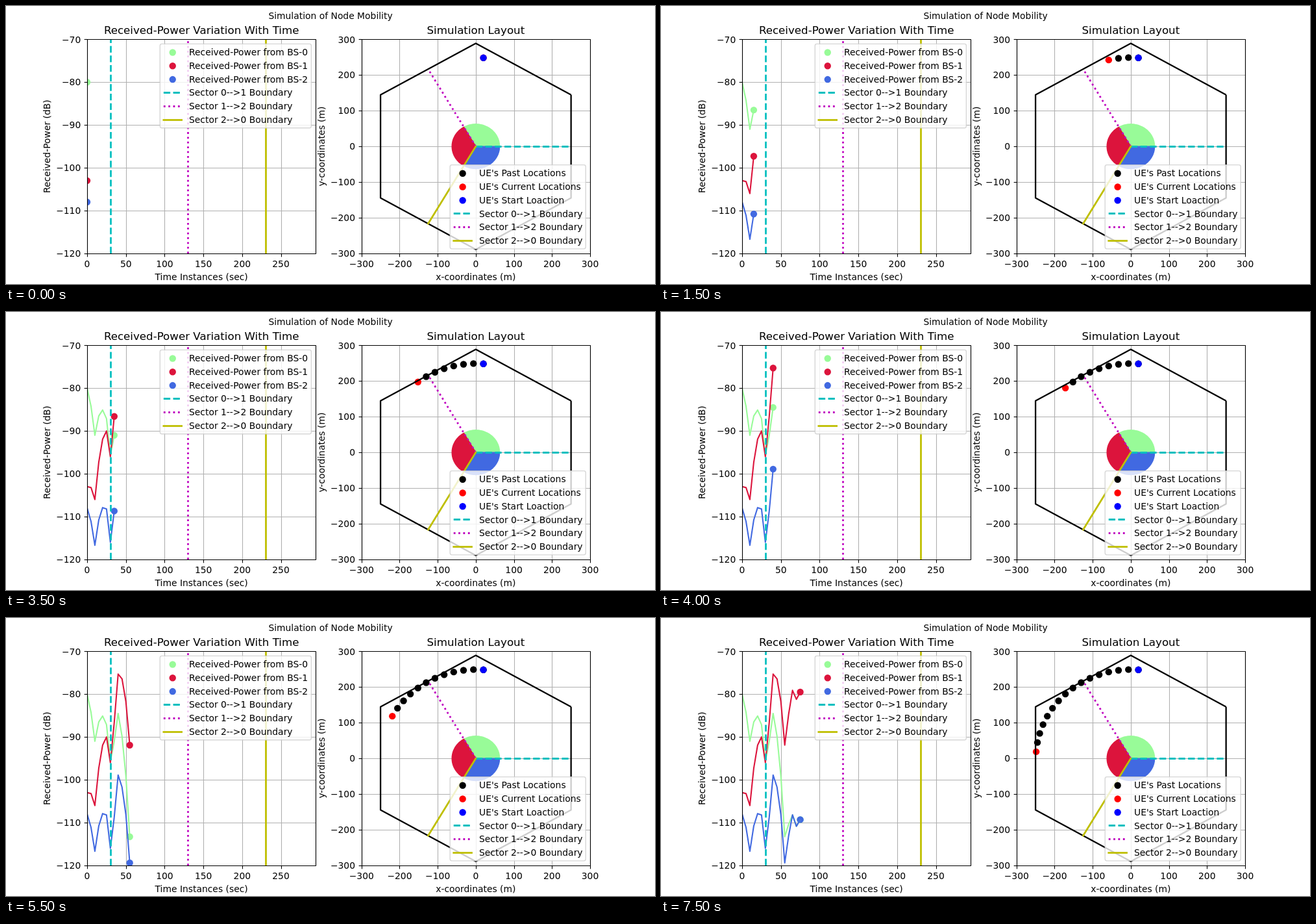
Write an HTML page with a canvas that moves like this. It is 1000 by 428 pixels and loops after 8000 ms.

```html
<!DOCTYPE html>
<html lang="en">
<head>
<meta charset="utf-8">
<title>Simulation of Node Mobility</title>
<style>
  html, body { margin: 0; width: 100%; height: 100%; overflow: hidden; background: #fff; }
  canvas { display: block; width: 1000px; height: 428px; }
</style>
</head>
<body>
<canvas id="stage" width="1000" height="428"></canvas>
<script>
const ctx = document.getElementById('stage').getContext('2d');

const STEP_MS = 500, STEPS = 16;
const PT = 100 / 72, EM = 10 * PT;
const TOP = 51.36, BOTTOM = 380.92, WIDTH = 352.27;
const CYAN = '#00bfbf', MAGENTA = '#bf00bf', OLIVE = '#bfbf00';
const DASHED = [3.7, 1.6], DOTTED = [1, 1.65];

// Received power in dB, one value every 5 s
const stations = [
  { color: '#98fb98', power: [-80, -84.2, -91, -86.5, -85.1, -87.1, -95.7, -91, -84.5, -89.8, -99.1, -113.3, -110.4, -108.2, -110.85, -109.3] },
  { color: '#dc143c', power: [-103, -103.2, -106, -97.3, -91.9, -90, -96, -86.6, -75.3, -76.4, -81.7, -91.9, -84.7, -79.1, -81.2, -79.5] },
  { color: '#4169e1', power: [-108, -111.1, -116.7, -110.8, -107.9, -108.2, -116, -108.7, -98.9, -101.7, -108.1, -119.4, -113.1, -108.2, -110.85, -109.3] }
];

const boundaries = [
  { label: 'Sector 0-->1 Boundary', color: CYAN, dash: DASHED, time: 30, angle: 0 },
  { label: 'Sector 1-->2 Boundary', color: MAGENTA, dash: DOTTED, time: 130, angle: 120 },
  { label: 'Sector 2-->0 Boundary', color: OLIVE, dash: null, time: 230, angle: 240 }
];

const range = (from, to, step) =>
  Array.from({ length: Math.round((to - from) / step) + 1 }, (_, i) => from + i * step);

function makeAxes(left, xmin, xmax, ymin, ymax, xticks, yticks, title, xlabel, ylabel) {
  const x = v => left + (v - xmin) / (xmax - xmin) * WIDTH;
  const y = v => BOTTOM - (v - ymin) / (ymax - ymin) * (BOTTOM - TOP);
  return { left, right: left + WIDTH, x, y, xticks, yticks, title, xlabel, ylabel };
}

const powerAxes = makeAxes(125, 0, 295, -120, -70, range(0, 250, 50), range(-120, -70, 10),
  'Received-Power Variation With Time', 'Time Instances (sec)', 'Received-Power (dB)');
const mapAxes = makeAxes(547.73, -300, 300, -300, 300, range(-300, 300, 100), range(-300, 300, 100),
  'Simulation Layout', 'x-coordinates (m)', 'y-coordinates (m)');

const snap = v => Math.round(v) + 0.5;
const rad = deg => deg * Math.PI / 180;
const polar = (r, deg) => [r * Math.cos(rad(deg)), r * Math.sin(rad(deg))];
const onMap = ([x, y]) => [mapAxes.x(x), mapAxes.y(y)];
const userAt = n => onMap(polar(249, 85.4 + 6.02 * n));

function line(points, color, width, dash, cap = 'butt') {
  ctx.strokeStyle = color;
  ctx.lineWidth = width;
  ctx.lineCap = cap;
  ctx.lineJoin = 'round';
  ctx.setLineDash(dash ? dash.map(d => d * width) : []);
  ctx.beginPath();
  points.forEach(p => ctx.lineTo(...p));
  ctx.stroke();
  ctx.setLineDash([]);
}

function boundaryLine(points, b) {
  line(points, b.color, 2 * PT, b.dash, b.dash ? 'butt' : 'square');
}

function dot([x, y], color) {
  ctx.fillStyle = color;
  ctx.beginPath();
  ctx.arc(x, y, 3.75 * PT, 0, 2 * Math.PI);
  ctx.fill();
}

function text(str, x, y, align = 'center', size = EM) {
  ctx.font = `${size}px "DejaVu Sans", sans-serif`;
  ctx.textAlign = align;
  ctx.fillStyle = '#000';
  ctx.fillText(str, x, y);
}

function clipped(axes, draw) {
  ctx.save();
  ctx.beginPath();
  ctx.rect(axes.left, TOP, WIDTH, BOTTOM - TOP);
  ctx.clip();
  draw();
  ctx.restore();
}

function grid(axes) {
  const color = '#b0b0b0', w = 0.8 * PT;
  axes.xticks.forEach(v => line([[snap(axes.x(v)), BOTTOM], [snap(axes.x(v)), TOP]], color, w));
  axes.yticks.forEach(v => line([[axes.left, snap(axes.y(v))], [axes.right, snap(axes.y(v))]], color, w));
}

function frame(axes) {
  const w = 0.8 * PT, tick = 3.5 * PT;
  const l = snap(axes.left), r = snap(axes.right), t = snap(TOP), b = snap(BOTTOM);
  const name = v => String(v).replace('-', '\u2212');
  line([[l, t], [r, t], [r, b], [l, b], [l, t]], '#000', w, null, 'square');
  axes.xticks.forEach(v => {
    const x = snap(axes.x(v));
    line([[x, b], [x, b + tick]], '#000', w);
    text(name(v), axes.x(v), 402);
  });
  axes.yticks.forEach(v => {
    const y = snap(axes.y(v));
    line([[l, y], [l - tick, y]], '#000', w);
    text(name(v), axes.left - 2 * tick, Math.round(axes.y(v) + 5.2), 'right');
  });
  const mid = (axes.left + axes.right) / 2;
  text(axes.title, mid, 43, 'center', 12 * PT);
  text(axes.xlabel, mid, 422);
  ctx.save();
  ctx.translate(axes.left - 57, (TOP + BOTTOM) / 2);
  ctx.rotate(-Math.PI / 2);
  text(axes.ylabel, 0, 0);
  ctx.restore();
}

function legend(left, top, right, dots) {
  ctx.beginPath();
  ctx.roundRect(left, top, right - left, 129.3, 0.2 * EM);
  ctx.fillStyle = 'rgba(255,255,255,0.8)';
  ctx.fill();
  ctx.strokeStyle = 'rgba(204,204,204,0.8)';
  ctx.lineWidth = PT;
  ctx.stroke();
  const x = left + 0.4 * EM;
  [...dots, ...boundaries].forEach((item, i) => {
    const y = top + 12.8 + 20.78 * i;
    if (i < dots.length) dot([x + EM, y + 0.3], item.color);
    else boundaryLine([[x, snap(y - 0.3)], [x + 2 * EM, snap(y - 0.3)]], item);
    text(item.label, Math.round(x + 2.8 * EM), Math.round(y + 4.9), 'left');
  });
}

function drawPower(n) {
  const at = (s, i) => [powerAxes.x(5 * i), powerAxes.y(s.power[i])];
  clipped(powerAxes, () => {
    grid(powerAxes);
    stations.forEach(s => dot(at(s, n), s.color));
    if (n > 0) {
      stations.forEach(s => line(range(0, n, 1).map(i => at(s, i)), s.color, 1.5 * PT));
    }
    boundaries.forEach(b => {
      const x = snap(powerAxes.x(b.time));
      boundaryLine([[x, BOTTOM], [x, TOP]], b);
    });
  });
  frame(powerAxes);
  legend(237.3, 58.4, 470.4, stations.map((s, i) =>
    ({ label: `Received-Power from BS-${i}`, color: s.color })));
}

function wedge(start, color) {
  ctx.fillStyle = color;
  ctx.beginPath();
  ctx.moveTo(...onMap([0, 0]));
  range(start, start + 120, 3).forEach(a => ctx.lineTo(...onMap(polar(62.5, a))));
  ctx.closePath();
  ctx.fill();
  ctx.strokeStyle = color;
  ctx.lineWidth = PT;
  ctx.lineJoin = 'miter';
  ctx.stroke();
}

function drawMap(n) {
  clipped(mapAxes, () => {
    grid(mapAxes);
    stations.forEach((s, i) => wedge(120 * i, s.color));
    for (let i = 0; i < n; i++) dot(userAt(i), '#000');
    dot(userAt(n), '#f00');
    dot(userAt(0), '#00f');
    line(range(30, 390, 60).map(a => onMap(polar(288.675, a))), '#000', 2.3);
    boundaries.forEach(b => {
      const ends = [[0, 0], polar(250, b.angle)].map(onMap);
      if (b.angle === 0) ends.forEach(p => { p[1] = snap(p[1]); });
      boundaryLine(ends, b);
    });
  });
  frame(mapAxes);
  legend(684.2, 244.6, 893.2, [
    { label: "UE's Past Locations", color: '#000' },
    { label: "UE's Current Locations", color: '#f00' },
    { label: "UE's Start Loaction", color: '#00f' }
  ]);
}

function draw(n) {
  ctx.fillStyle = '#fff';
  ctx.fillRect(0, 0, 1000, 428);
  text('Simulation of Node Mobility', 500, 20);
  drawPower(n);
  drawMap(n);
}

const begin = performance.now();
function tick() {
  const elapsed = Math.max(0, performance.now() - begin);
  draw(Math.floor(elapsed / STEP_MS) % STEPS);
  requestAnimationFrame(tick);
}
tick();
</script>
</body>
</html>
```
